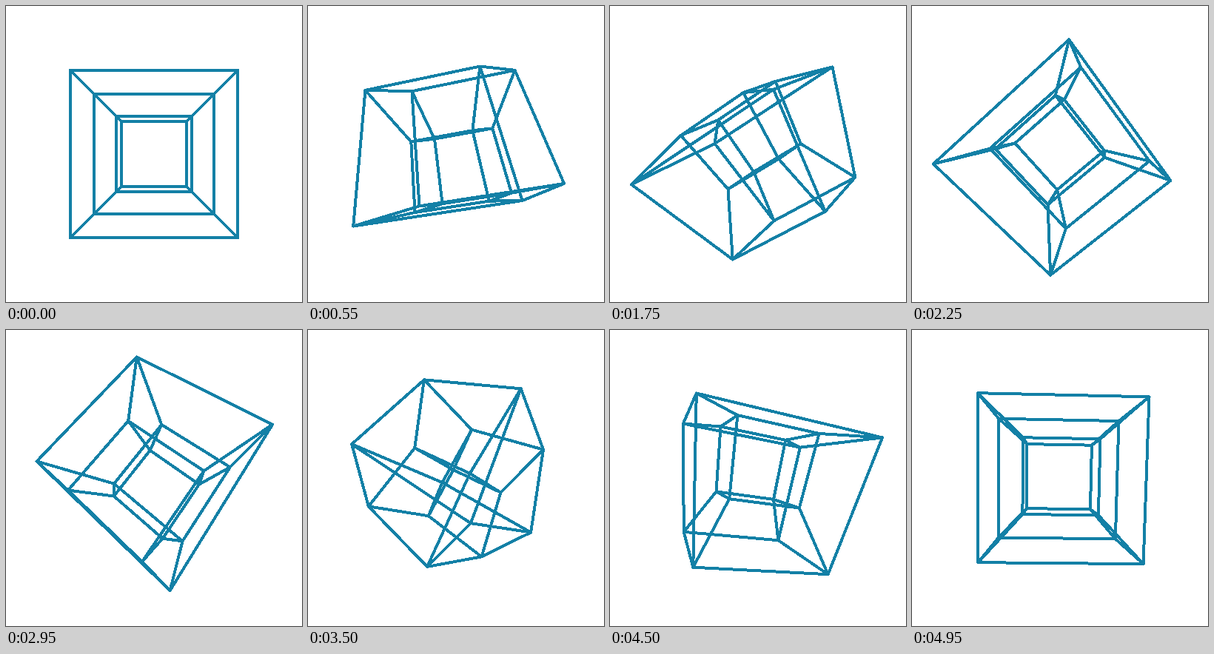
An HTML page that plays this animation: 400 by 400 pixels, repeating every 5 s.

```html
<!DOCTYPE html>
<html lang="en">
<head>
<meta charset="utf-8">
<title>Rotating tesseract</title>
<style>
  html, body { margin: 0; width: 100%; height: 100%; overflow: hidden; background: #fff; }
  svg { display: block; width: 100vw; height: 100vh; }
  path { fill: none; stroke: #1380a6; stroke-width: 4; stroke-linecap: round; shape-rendering: crispEdges; }
</style>
</head>
<body>
<svg viewBox="0 0 400 400"><path id="wire"/></svg>
<script>
const LOOP = 5000, STEP = 50;
const CENTER = 200, SCALE = 400 * Math.SQRT2, EYE = 3;
const wire = document.getElementById('wire');

// Corners are numbered 0-15, one bit per axis; edges flip a single bit.
const corners = Array.from({ length: 16 }, (_, n) =>
  [0, 1, 2, 3].map(axis => (n >> axis & 1 ? 1 : -1)));
const edges = [];
for (let n = 0; n < 16; n++) {
  for (let bit = 1; bit < 16; bit <<= 1) {
    if (!(n & bit)) edges.push([n, n | bit]);
  }
}

function turn(a, b, angle) {
  const c = Math.cos(angle), s = Math.sin(angle);
  return [a * c - b * s, a * s + b * c];
}

// Half a turn in xz and yw, a quarter turn in xy and zw, then 4D and 3D perspective.
function project([x, y, z, w], progress) {
  const half = Math.PI * progress, quarter = half / 2;
  [x, z] = turn(x, z, half);
  [y, w] = turn(y, w, half);
  [x, y] = turn(x, y, -quarter);
  [z, w] = turn(z, w, -quarter);
  const k = SCALE / (EYE * (EYE - w) - z);
  return [x, y].map(v => (CENTER + v * k).toFixed(2)).join(' ');
}

function draw(time) {
  const progress = Math.floor(time % LOOP / STEP) * STEP / LOOP;
  const points = corners.map(corner => project(corner, progress));
  wire.setAttribute('d', edges.map(([a, b]) => `M${points[a]}L${points[b]}`).join(''));
}

const start = performance.now();
function tick() {
  draw(performance.now() - start);
  requestAnimationFrame(tick);
}
tick();
</script>
</body>
</html>
```
